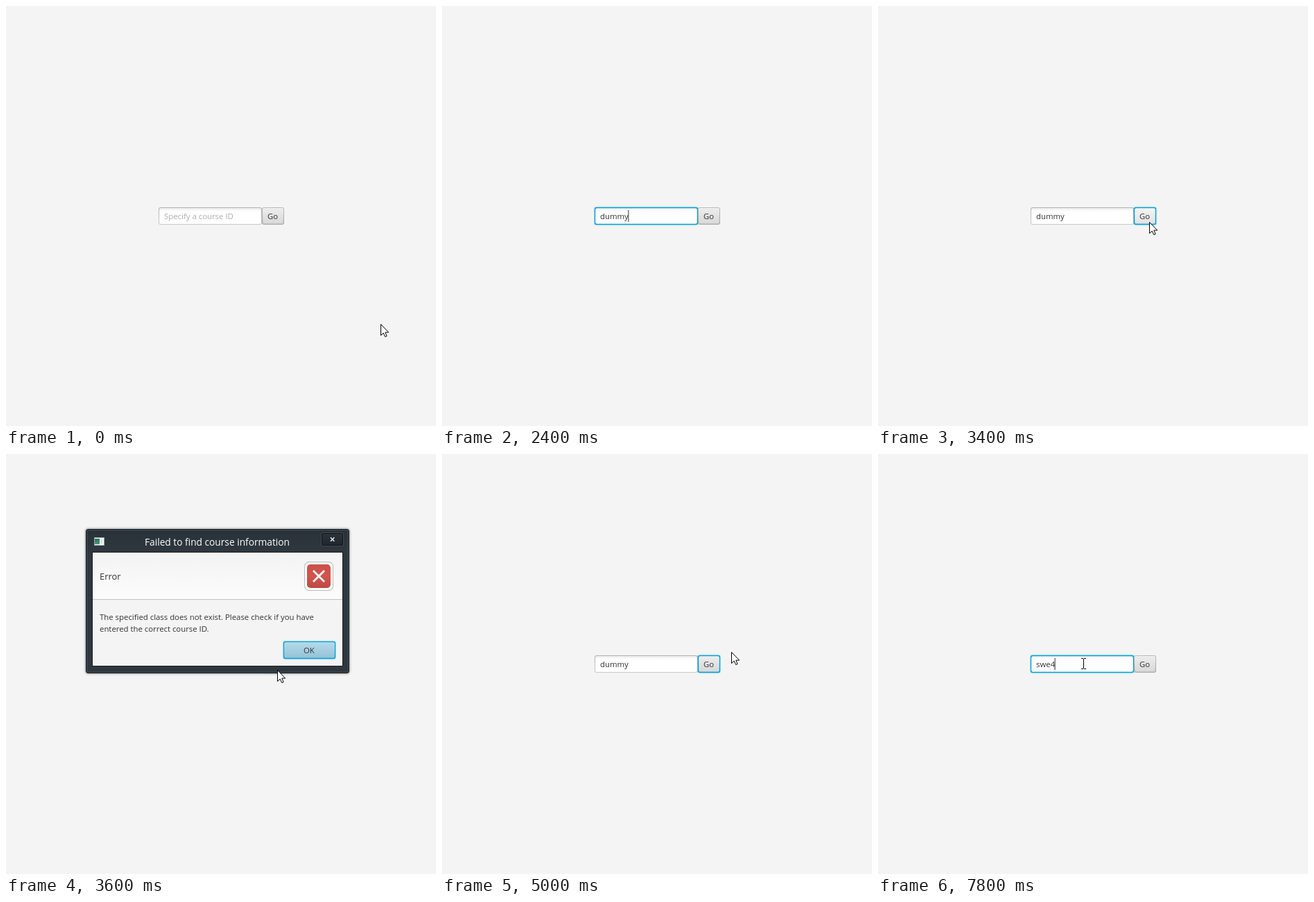
Recreate the animation shown at these times as an HTML page with a canvas. Size 620 by 605 pixels, loop 8 s.

```html
<!DOCTYPE html>
<html lang="en">
<head>
<meta charset="utf-8">
<title>Course lookup</title>
<style>
html, body { margin: 0; width: 100%; height: 100%; overflow: hidden; background: #f4f4f4; }
canvas { display: block; }
</style>
</head>
<body>
<canvas id="stage" width="620" height="605"></canvas>
<script>
const ctx = document.getElementById('stage').getContext('2d');
const LOOP = 8000, STEP = 200;
const ACCENT = '#039ed3', HALO = 'rgba(3,158,211,.13)';
const BODY = 11.38;
const FIELD = { x: 220, y: 290, w: 149, h: 25 };
const GO = { x: 369, y: 290, w: 32, h: 25 };
const OK = { x: 400, y: 270, w: 75, h: 25 };

// Pointer moves: start, end, from, bend, to
const MOVES = [
  [0, 1000, [540, 458], [423, 382], [306, 307]],
  [2600, 3200, [306, 307], [350, 325], [391, 311]],
  [3600, 4400, [391, 311], [404, 298], [417, 285]],
  [5000, 5600, [417, 285], [356, 293], [296, 302]]
];

const GREY = {
  normal: ['#ececec', '#d9d9d9'],
  hover: ['#f4f4f4', '#e2e2e2'],
  pressed: ['#d6d6d6', '#c4c4c4']
};
const BLUE = {
  normal: ['#b2d9e8', '#97c3d8'],
  hover: ['#bfe2ef', '#a3cee0'],
  pressed: ['#9fc8d8', '#88b3c5']
};

const within = (t, a, b) => t >= a && t < b;
const inside = (p, r) => within(p[0], r.x, r.x + r.w) && within(p[1], r.y, r.y + r.h);

function fade(y0, y1, ...colors) {
  const g = ctx.createLinearGradient(0, y0, 0, y1);
  colors.forEach((c, i) => g.addColorStop(i / (colors.length - 1), c));
  return g;
}

function rect(x, y, w, h, color) {
  ctx.fillStyle = color;
  ctx.fillRect(x, y, w, h);
}

function round(x, y, w, h, r, color) {
  ctx.beginPath();
  ctx.roundRect(x, y, w, h, r);
  ctx.fillStyle = color;
  ctx.fill();
}

function layer(b, inset, r, color) {
  round(b.x + inset, b.y + inset, b.w - 2 * inset, b.h - 2 * inset, r, color);
}

function text(s, x, y, size = BODY, color = '#333') {
  ctx.font = `${size}px "Open Sans", "Noto Sans", sans-serif`;
  ctx.fillStyle = color;
  ctx.fillText(s, x, y);
  return ctx.measureText(s).width;
}

function cross(x, y, r, width) {
  ctx.beginPath();
  ctx.moveTo(x - r, y - r);
  ctx.lineTo(x + r, y + r);
  ctx.moveTo(x + r, y - r);
  ctx.lineTo(x - r, y + r);
  ctx.strokeStyle = '#fff';
  ctx.lineWidth = width;
  ctx.stroke();
}

function pointerAt(t) {
  let pos = MOVES[0][2];
  for (const [start, end, from, bend, to] of MOVES) {
    if (t < start) break;
    const u = Math.min(1, (t - start) / (end - start));
    const p = u * u * (3 - 2 * u), q = 1 - p;
    pos = from.map((v, i) => Math.round(q * q * v + 2 * p * q * bend[i] + p * p * to[i]));
  }
  return pos;
}

function typedAt(t) {
  if (t < 6600) return 'dummy'.slice(0, Math.max(0, Math.floor((t - 1400) / STEP)));
  return t < 7800 ? 'swe'.slice(0, Math.floor((t - 6400) / STEP)) : 'swe4';
}

function drawField(t, focused) {
  const { x, y, h } = FIELD;
  if (focused) {
    layer(FIELD, -1.4, 4, HALO);
    layer(FIELD, -0.2, 3, ACCENT);
  } else {
    layer(FIELD, 0, 3, fade(y, y + h, '#b2b2b2', '#c8c8c8'));
  }
  layer(FIELD, focused ? 1.2 : 1, 2, fade(y + 1, y + 6, focused ? '#f2f2f2' : '#ececec', '#fff'));

  const value = typedAt(t), selected = within(t, 6200, 6600);
  if (!value && !focused) {
    text('Specify a course ID', x + 8, 307, BODY, '#aeaeae');
    return;
  }
  if (selected) rect(228, 294, 41, 17, '#0096c9');
  const w = text(value, x + 8, 307, BODY, selected ? '#fff' : '#333');
  const caret = within(t, 1400, 3200) || within(t, 5600, 6000) ||
    within(t, 6600, 7600) || t >= 7800;
  if (caret) rect(227.5 + w, 294, 1, 17, '#333');
}

function drawButton(b, label, tx, ty, colors, focused) {
  if (focused) {
    layer(b, -1.4, 4, HALO);
    layer(b, -0.2, 3, ACCENT);
  } else {
    layer(b, 0, 3, fade(b.y, b.y + b.h, '#bababa', '#aaaaaa'));
  }
  const [top, bottom] = colors;
  layer(b, focused ? 1.2 : 1, 2, fade(b.y, b.y + b.h, 'rgba(255,255,255,.85)', 'rgba(255,255,255,.3)'));
  layer(b, focused ? 1.4 : 2, 1.5, fade(b.y + 2, b.y + b.h - 2, top, bottom));
  text(label, tx, ty);
}

function drawDialog(okState) {
  for (let i = 3; i > 0; i--) {
    round(115 - i, 108 - i, 380 + 2 * i, 208 + 2 * i, 4 + i, 'rgba(0,0,0,.06)');
  }
  round(115, 108, 380, 208, 4, '#0d1114');
  round(116, 109, 378, 206, 3, '#46515a');
  round(117, 110, 376, 204, 2, fade(110, 142, '#293239', '#2f383e'));
  rect(124, 141, 362, 165, '#171c20');

  // Window icon
  rect(127, 120, 15, 12, '#9aa3a6');
  rect(128, 121, 13, 10, '#f4f6f6');
  rect(128, 122, 7, 8, fade(122, 130, '#326a70', '#479a73'));
  rect(136, 123, 3, 6, '#d5dedb');

  text('Failed to find course information', 200, 132, 13.72, '#fff');

  round(454, 113, 33, 20, 3, '#414b53');
  round(455, 114, 31, 18, 2, '#0d1115');
  round(456, 115, 29, 16, 1, fade(115, 131, '#2b333b', '#20272e'));
  cross(470.7, 123, 2.7, 1.3);

  rect(125, 142, 360, 163, '#f4f4f4');
  rect(125, 142, 360, 67, fade(142, 209, '#f3f3f3', '#fcfcfc'));
  rect(125, 209, 360, 1, '#c3c3c3');
  text('Error', 135, 181, 12.9);

  round(430, 155, 42, 42, 7, '#b9b9b9');
  round(431, 156, 40, 40, 6, '#fff');
  round(434, 159, 34, 34, 5, fade(159, 193, '#cb5049', '#d0554e', '#bd4a43'));
  cross(451, 176, 8, 2.7);

  text('The specified class does not exist. Please check if you have', 135, 239);
  text('entered the correct course ID.', 135, 256);
  drawButton(OK, 'OK', 429, 287, BLUE[okState], true);
}

function drawArrow([x, y]) {
  ctx.save();
  ctx.translate(x + 0.5, y + 0.5);
  const shape = new Path2D('M0 0V16L3.7 12.6L6.2 18L8.6 17L6.3 11.6H11.2Z');
  ctx.fillStyle = '#fff';
  ctx.fill(shape);
  ctx.strokeStyle = '#000';
  ctx.lineWidth = 1;
  ctx.stroke(shape);
  ctx.restore();
}

// The text pointer inverts what lies below it
function drawBeam([x, y]) {
  ctx.globalCompositeOperation = 'difference';
  rect(x, y - 7, 1, 14, '#fff');
  for (const row of [y - 8, y + 7]) {
    rect(x - 3, row, 3, 1, '#fff');
    rect(x + 1, row, 3, 1, '#fff');
  }
  ctx.globalCompositeOperation = 'source-over';
}

function draw(t) {
  const pos = pointerAt(t);
  const dialog = within(t, 3600, 5000);
  const fieldFocus = within(t, 1200, 3200) || t >= 5600;
  const goFocus = within(t, 3200, 5600);

  rect(0, 0, 620, 605, '#f4f4f4');
  drawField(t, fieldFocus);
  const goState = t === 3200 ? 'pressed' : inside(pos, GO) ? 'hover' : 'normal';
  drawButton(GO, 'Go', 377, 307, GREY[goState], goFocus);
  if (dialog) drawDialog(t === 4800 ? 'pressed' : inside(pos, OK) ? 'hover' : 'normal');

  if (within(t, 1600, 2800)) return;
  if (!dialog && inside(pos, FIELD)) drawBeam(pos);
  else drawArrow(pos);
}

function tick() {
  draw(Math.floor(performance.now() % LOOP / STEP) * STEP);
  requestAnimationFrame(tick);
}
tick();
</script>
</body>
</html>
```
